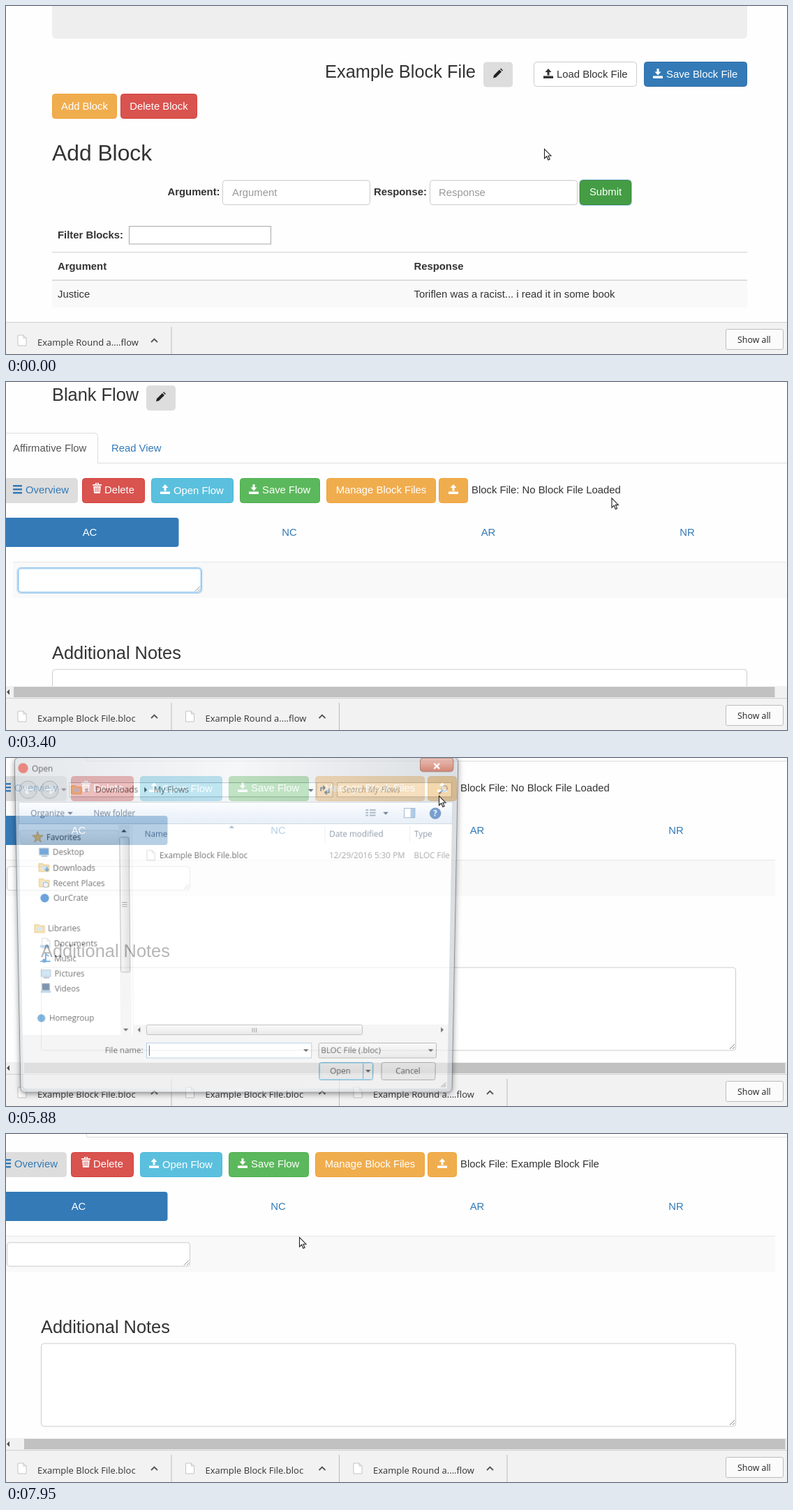
An HTML page for the animation above (8 s loop, 1119 by 500 pixels).

```html
<!DOCTYPE html>
<html lang="en">
<head>
<meta charset="utf-8">
<title>Block file demo</title>
<style>
html, body { margin: 0; width: 100%; height: 100%; overflow: hidden; background: #fefefe; }
svg { position: absolute; left: 0; top: 0; }
text { font: 14.85px "Liberation Sans", Arial, sans-serif; fill: #333; white-space: pre; }
text.ui { font-family: "Open Sans", "Noto Sans", sans-serif; fill: #222; }
#dialog { transform-origin: 330px 250px; overflow: visible; filter: drop-shadow(0 2px 4px #0009); }
</style>
</head>
<body>
<svg id="page" width="1119" height="500"></svg>
<svg id="dialog" width="660" height="500"></svg>
<svg id="pointer" width="1119" height="500"></svg>
<script>
const LOOP = 8000, BLUE = '#337ab7';

// Drawing helpers
const text = (x, y, s, style = '', attrs = '') => `<text x="${x}" y="${y}" style="${style}" ${attrs}>${s}</text>`;
const bold = (x, y, s) => text(x, y, s, 'font-weight:bold');
const middle = (x, y, s, fill) => text(x, y, s, `fill:${fill}`, 'text-anchor="middle"');
const ui = (x, y, s, fill = '#222', size = 12.2, more = '') => text(x, y, s, `fill:${fill};font-size:${size}px;${more}`, 'class="ui"');
const rect = (x, y, w, h, fill, stroke = 'none', r = 0) =>
  `<rect x="${x}" y="${y}" width="${w}" height="${h}" rx="${r}" fill="${fill}" stroke="${stroke}"/>`;
const path = (d, fill = 'none', stroke = 'none', width = 1) =>
  `<path d="${d}" fill="${fill}" stroke="${stroke}" stroke-width="${width}" fill-rule="evenodd"/>`;
const circle = (x, y, r, fill, stroke = 'none') => `<circle cx="${x}" cy="${y}" r="${r}" fill="${fill}" stroke="${stroke}"/>`;
const move = (x, y, s) => `<g transform="translate(${x} ${y})">${s}</g>`;
const box = (x, y, w, h, fill, stroke) => rect(x + .5, y + .5, w - 1, h - 1, fill, stroke, 4);
const field = (x, y, w, h, stroke = '#ccc') => box(x, y, w, h, '#fff', stroke);

const ICONS = {
  up: 'M0 10.5h14v3.5h-14zM7 0l4.5 5h-3v4.5h-3v-4.5h-3z',
  down: 'M0 10.5h14v3.5h-14zM7 9.5l-4.5-5h3v-4.5h3v4.5h3z',
  pencil: 'M0 14l1-4 8-8 3 3-8 8zM10 1l1-1 3 3-1 1z',
  trash: 'M0 2h4v-2h5v2h4v1.7h-13zM5 2h3v-1h-3zM1.2 4.7h10.6l-1 10.3h-8.6zM3.5 6.3h1v7h-1zM6 6.3h1v7h-1zM8.5 6.3h1v7h-1z',
  menu: 'M0 0h13v2.6h-13zM0 5h13v2.6h-13zM0 10h13v2.6h-13z',
};
const icon = (name, x, y, fill = '#fff') => move(x, y, path(ICONS[name], fill));
const glow = (x, y, w, h) => `<g opacity=".55">${rect(x - 1, y - 1, w + 2, h + 2, 'none', '#66afe9', 5)}</g>`;
const editButton = (x, y) => box(x, y, 42, 36, '#ddd', '#ddd') + icon('pencil', x + 14, y + 9, '#222');
const resizeGrip = (x, y) => path(`M${x - 7} ${y}l7-7M${x - 3} ${y}l3-3`, 'none', '#888');
const sheetIcon = (x, y) => path(`M${x} ${y}h8l4 4v11h-12zM${x + 8} ${y}v4h4`, '#fff', '#c4c4c4');
const triangle = (x, y, angle, fill = '#222') =>
  `<path transform="translate(${x} ${y}) rotate(${angle})" d="M-4-2h8l-4 4z" fill="${fill}"/>`;
const DOWN = 0, LEFT = 90, UP = 180, RIGHT = 270;

// Progress in n held steps: the first at a, the last at b
function steps(t, a, b, n) {
  if (t < a) return 0;
  if (t >= b) return 1;
  return Math.min(1, (Math.floor((t - a) / (b - a) * (n - 1)) + 1) / n);
}
const mix = (a, b, p) => a + (b - a) * p;

function blocksPage(t) {
  const saveHover = t >= 1600, clicked = t >= 1910;
  return rect(66, -20, 996, 67, '#eee', 'none', 6)
    + text(457, 102.5, 'Example Block File', 'font-size:25.4px') + editButton(684, 80.5)
    + box(756, 80, 148, 36, '#fff', '#ccc') + icon('up', 770, 90, '#333') + text(789, 103, 'Load Block File')
    + box(914, 80, 148, 36, saveHover ? '#286090' : BLUE, saveHover ? '#204d74' : '#2e6da4')
    + (clicked ? glow(914, 80.5, 148, 35) : '')
    + icon('down', 927, 90) + text(946, 102.5, 'Save Block File', 'fill:#fff')
    + box(66, 126, 93, 36, '#f0ad4e', '#eea236') + middle(112.5, 149, 'Add Block', '#fff')
    + box(164, 126, 110, 36, '#d9534f', '#d43f3a') + middle(219, 149, 'Delete Block', '#fff')
    + text(66, 222, 'Add Block', 'font-size:31.8px')
    + bold(231.5, 272, 'Argument:') + field(310, 250, 212, 36) + text(324, 273, 'Argument', 'fill:#999')
    + bold(527, 272, 'Response:') + field(607, 250, 212, 36) + text(620, 273, 'Response', 'fill:#999')
    + box(822, 250, 74, 36, clicked ? '#5cb85c' : '#449d44', clicked ? '#4cae4c' : '#398439')
    + (clicked ? '' : glow(822.5, 250.5, 73, 35)) + middle(859, 272, 'Submit', '#fff')
    + bold(74, 334, 'Filter Blocks:') + rect(176.5, 316.5, 203, 25.5, '#fff', '#a9a9a9')
    + rect(66, 353, 996, 1.5, '#ddd') + bold(74, 379, 'Argument') + bold(584.5, 379, 'Response')
    + rect(66, 393, 996, 2, '#ddd') + rect(66, 395, 996, 38, '#f9f9f9')
    + text(74, 418.5, 'Justice') + text(584.5, 418.5, 'Toriflen was a racist... i read it in some book');
}

function flowPage(t) {
  const scrolled = t >= 4080;
  const uploadHover = t >= 5090 && t < 7870;
  const arHover = t >= 4465 && t < 4720;
  const fileName = t < 7510 ? 'No Block File Loaded' : 'Example Block File';
  const page = text(66, 27, 'Blank Flow', 'font-size:25.4px') + editButton(201, 5)
    + path('M-20 73.5H128q3.5 0 3.5 4V116.5H1140', 'none', '#ddd')
    + text(10, 100, 'Affirmative Flow', 'fill:#555') + text(151, 100, 'Read View', `fill:${BLUE}`)
    + box(-20, 138, 123, 36, '#ddd', '#ddd') + icon('menu', 10, 148, BLUE) + text(28, 160, 'Overview', `fill:${BLUE}`)
    + box(109, 138, 90, 36, '#d9534f', '#d43f3a') + icon('trash', 124, 145) + text(141, 160, 'Delete', 'fill:#fff')
    + box(208, 138, 118, 36, '#5bc0de', '#46b8da') + icon('up', 221, 147) + text(240, 161, 'Open Flow', 'fill:#fff')
    + box(335, 138, 115, 36, '#5cb85c', '#4cae4c') + icon('down', 348, 147) + text(367, 160, 'Save Flow', 'fill:#fff')
    + box(459, 138, 157, 36, '#f0ad4e', '#eea236') + middle(537.5, 160, 'Manage Block Files', '#fff')
    + box(620, 138, 42, 36, uploadHover ? '#ec971f' : '#f0ad4e', uploadHover ? '#d58512' : '#eea236') + icon('up', 634, 147)
    + text(667, 160, 'Block File: ' + fileName)
    + rect(-20, 195, 267.5, 42, BLUE, 'none', 4) + middle(120, 221, 'AC', '#fff')
    + (arHover ? rect(564, 195, 254, 42, '#eee', 'none', 4) : '')
    + middle(406, 221, 'NC', BLUE) + middle(691, 221, 'AR', arHover ? '#23527c' : BLUE) + middle(976, 221, 'NR', BLUE)
    + rect(10, 258.5, 1108, 1, '#ddd') + rect(10, 259.5, 1108, 51, '#f9f9f9')
    + field(17, 267.5, 263, 35, scrolled ? '#ccc' : '#66afe9')
    + (scrolled ? '' : glow(17, 267.5, 263, 35)) + resizeGrip(278, 300.5)
    + text(66, 397.5, 'Additional Notes', 'font-size:25.4px') + field(66, 412.5, 996, 120) + resizeGrip(1060, 530);
  return move(scrolled ? -16 : 0, scrolled ? -112 : 0, page)
    + rect(0, 437, 1119, 17, '#f1f1f1') + rect(scrolled ? 26 : 11, 438, 1090.5, 15, '#c1c1c1')
    + triangle(3, 445.5, LEFT, '#505050');
}

function shelfItem(name, x, width, busy) {
  return move(x, 0,
    `<svg y="455" width="${width + 1}" height="45" viewBox="0 455 ${width + 1} 45">`
    + (busy ? `<g opacity="${busy}">${circle(23, 480, 13, '#e3eaf2', '#c5d6e6')}</g>` : '')
    + sheetIcon(17, 473) + ui(45, 488, name, '#333', 13)
    + path(`M${width - 29} 483l4.5-4.5 4.5 4.5`, 'none', '#555', 1.8) + '</svg>'
    + rect(width - .5, 461, 1, 39, '#bbb'));
}

function shelf(t) {
  const names = ['Example Round a....flow'], block = 'Example Block File.bloc';
  if (t >= 2210) names.unshift(block);
  if (t >= 4080) names.unshift(block);
  const p = Math.floor((t - 2210) / 77) * 77 / 800;
  const firstWidth = t < 2210 || t >= 3010 ? 237 : 237 * (1 - (1 - p) ** 3);
  const busy = t < 2210 ? 0 : 1 - steps(t, 2780, 3010, 4);
  let x = 0, out = rect(0, 454, 1119, 46, '#f2f2f2') + rect(0, 454, 1119, 1, '#cfcfcf');
  names.forEach((name, i) => {
    const width = i ? 237 : firstWidth;
    out += shelfItem(name, x, width, i ? 0 : busy);
    x += width + 3.5;
  });
  return out + rect(1031.5, 464.5, 82, 29, '#fbfbfb', '#bdbdbd', 2) + ui(1048, 484, 'Show all', '#222', 12.4);
}

function downloadStart(t) {
  if (t < 1990 || t >= 3240) return '';
  let out = path('M-1 430.5H372q5 0 5 5V454.5H-1z', '#f1f1f1', '#c8c8c8')
    + ui(25, 446, 'application/json;charset=utf-8,%7B"name"%3A"Example Blo...', '#777', 12);
  const p = steps(t, 2210, 2700, 7);
  if (p > 0 && p < 1) {
    const y = mix(329, 409, p);
    out += `<g opacity="${Math.min(1, 1.5 * Math.sin(Math.PI * p))}">`
      + path(`M27 ${y}h9v10h6l-10.5 11.5-10.5-11.5h6zM14 ${y + 36}h34v4h-34z`, '#4a8af4') + '</g>';
  }
  return out;
}

function folderIcon(x, y) {
  return path(`M${x} ${y}h6l2 2h7v10h-15z`, '#f3d58a', '#d2a84e') + rect(x + 4, y + 4, 8, 5, '#bcdcf0');
}
const screenIcon = (x, y, fill) => rect(x, y, 14, 10, fill, '#8aa4bc') + rect(x + 3, y + 11, 9, 2, '#98a8b8');

function sidebar() {
  const item = (name, y, picture) => picture + ui(55, y + 4.5, name);
  return rect(6.5, 100.5, 147, 21, 'url(#grey)', '#d8d8d8', 2)
    + path('M33 102l2 6h6l-5 4 2 6-5-4-5 4 2-6-5-4h6z', '#f6b64a', '#d48a2c')
    + ui(46, 115.5, 'Favorites')
    + item('Desktop', 133, screenIcon(35, 127, '#2877c8'))
    + item('Downloads', 156.5, folderIcon(34, 150) + path('M46 155v6m-3-3l3 3 3-3', 'none', BLUE, 2))
    + item('Recent Places', 179.5, folderIcon(34, 173) + circle(44, 182, 4, '#e8eef4', '#789'))
    + item('OurCrate', 202, circle(42, 202, 6.5, '#1a6fc9'))
    + folderIcon(26, 242) + ui(46, 252.5, 'Libraries')
    + item('Documents', 271, sheetIcon(37, 263) + rect(34, 273, 14, 4, '#9cc4e4'))
    + item('Music', 294, path('M42 297v-10l5 3M34 298h15', 'none', '#2a7fd0', 2) + circle(40, 297, 3, '#2a7fd0'))
    + item('Pictures', 317, screenIcon(35, 311, '#b8d8ee'))
    + item('Videos', 340, rect(36, 332, 11, 10, '#345a88', '#678') + rect(34, 343, 15, 3, '#9cc4e4'))
    + circle(34, 385, 6, '#3c8cc8') + ui(46, 389.5, 'Homegroup');
}

const gradient = (id, direction, ...colors) => `<linearGradient id="${id}" ${direction}>`
  + colors.map((c, i) => `<stop offset="${i / (colors.length - 1)}" stop-color="${c}"/>`).join('') + '</linearGradient>';
const ACROSS = 'x2="1" y2="0"', DOWNWARD = 'x2="0" y2="1"';

function dialogBox(t) {
  const hover = t >= 6950, caret = t < 6600;
  return '<defs>' + gradient('glass', ACROSS, '#d5dbe0', '#f0f2f4', '#c6ccd2')
    + gradient('bar', DOWNWARD, '#fbfdff', '#e8f0f9', '#dbe6f2') + gradient('grey', DOWNWARD, '#f6f6f6', '#dedede')
    + gradient('thumb', ACROSS, '#f3f3f3', '#cfcfcf') + gradient('red', DOWNWARD, '#dfa090', '#bb4126') + '</defs>'
    + rect(.5, -8, 659, 508, 'url(#glass)', '#4a4f55', 7)
    + circle(13, 8, 7.5, '#db4437') + ui(26, 13.5, 'Open', '#111')
    + rect(603.5, -7, 49, 20, 'url(#red)', '#6b2a20', 4) + path('M624 1l8 8m0-8l-8 8', 'none', '#fff', 2.4)
    // navigation
    + circle(20, 40, 13, '#cfd4d9', '#8b949d') + circle(52, 40, 13, '#cfd4d9', '#8b949d')
    + path('M27 40h-13m6-6l-6 6 6 6M45 40h13m-6-6l6 6-6 6', 'none', '#fff', 3) + triangle(73, 40, DOWN, '#667')
    + rect(81.5, 29.5, 368, 21, '#f7fafc', '#9aa5b0') + folderIcon(84, 34)
    + ui(104, 44, '«') + ui(120, 44.5, 'Downloads') + triangle(195, 40, RIGHT) + ui(207, 44.5, 'My Flows') + triangle(441, 41, DOWN, '#113')
    + rect(449.5, 29.5, 24, 21, '#f2f6fa', '#9aa5b0') + path('M456 42v-5h5m-2-3l3 3-3 3M468 38v6h-5m2-3l-3 3 3 3', 'none', '#2a74b8', 1.7)
    + rect(480.5, 29.5, 170, 21, '#f7fafc', '#9aa5b0') + ui(488, 44.5, 'Search My Flows', '#7b8088', 12, 'font-style:italic')
    + circle(640, 38, 4.2, 'none', '#3a6ea5') + path('M637 41l-5 5', 'none', '#3a6ea5', 2.2)
    // toolbar
    + rect(5.5, 58.5, 647, 32, 'url(#bar)', '#b5c2d0')
    + ui(23, 79.5, 'Organize', '#1e395b') + triangle(82, 75, DOWN, '#1e395b') + ui(117, 79.5, 'New folder', '#1e395b')
    + path('M523 70h4m2 0h9M523 74h4m2 0h9M523 78h4m2 0h9', 'none', '#7890a8', 2) + triangle(553, 75, DOWN, '#1e395b')
    + rect(580.5, 67.5, 16, 14, '#fff', '#6a8cae') + rect(590, 68, 6, 13, '#7db0e0')
    + circle(627, 75, 8, '#2a68b8', '#1c4788') + ui(624, 79.5, '?', '#fff', 12, 'font-weight:bold')
    // file list
    + rect(5, 91, 647, 320, '#fff') + sidebar()
    + rect(154, 92, 17, 319, '#f0f0f0') + triangle(162, 101, UP) + rect(155.5, 110.5, 14, 204, 'url(#thumb)', '#9a9a9a', 2)
    + path('M158 208.5h8m-8 3h8m-8 3h8', 'none', '#777') + triangle(162, 403, DOWN) + rect(173, 92, 1, 319, '#e4e8ee')
    + ui(193, 110, 'Name', '#4c607a') + triangle(323, 95, UP, '#7a9cc0')
    + rect(462, 93, 1, 26, '#dde5ee') + ui(469, 110, 'Date modified', '#4c607a') + rect(589, 93, 1, 26, '#dde5ee') + ui(596, 110, 'Type', '#4c607a')
    + (hover ? rect(190.5, 126.5, 461, 22, '#f4f9fe', '#b8d6f0', 2) : '')
    + sheetIcon(196, 130) + ui(215, 142.5, 'Example Block File.bloc') + ui(469, 142.5, '12/29/2016 5:30 PM', '#777') + ui(596, 142.5, 'BLOC File', '#777')
    + rect(174, 395, 478, 16, '#f0f0f0') + triangle(182, 403, LEFT) + triangle(643, 403, RIGHT)
    + rect(193.5, 395.5, 328, 15, 'url(#grey)', '#9a9a9a', 2) + path('M354.5 400v7m3-7v7m3-7v7', 'none', '#666')
    // controls
    + rect(5, 411, 647, 83, '#f0f0f0') + ui(130, 439.5, 'File name:')
    + rect(193.5, 423.5, 251, 23, '#fff', '#8db2d8') + triangle(436, 435, DOWN) + (caret ? rect(197, 427, 1, 16, '#000') : '')
    + rect(455.5, 423.5, 179, 23, 'url(#grey)', '#8a8a8a', 2) + ui(459, 439.5, 'BLOC File (.bloc)') + triangle(626, 435, DOWN)
    + rect(456.5, 453.5, 82, 27, 'url(#grey)', '#3c7fb1', 3) + rect(457.5, 454.5, 80, 25, 'none', '#8edbf5', 2)
    + ui(473, 471, 'Open') + rect(523, 455, 1, 24, '#3c7fb1') + triangle(531, 467, DOWN)
    + rect(551.5, 453.5, 82, 27, 'url(#grey)', '#808080', 3) + ui(573, 471, 'Cancel')
    + path('M643 492l7-7m-3 7l3-3', 'none', '#aaa', 2);
}

// Pointer moves: start, end, steps, x, y, hand
const MOVES = [
  [680, 990, 5, 872, 155], [1220, 1680, 7, 958, 107, 1], [3240, 4010, 11, 626, 325], [4080, 4080, 1, 597, 182],
  [4390, 4540, 3, 630, 90, 1], [4690, 4720, 2, 630, 70, 1], [4940, 5240, 5, 615, 53, 1], [5400, 5400, 1, 620, 54],
  [6410, 7110, 10, 528, 131], [7870, 7950, 2, 420, 148],
];
function pointerAt(t) {
  let x = 771, y = 205, hand = 0;
  for (const [a, b, n, toX, toY, toHand = 0] of MOVES) {
    const p = steps(t, a, b, n);
    x = mix(x, toX, p);
    y = mix(y, toY, p);
    if (p >= .7) hand = toHand;
    else if (p > 0) hand = hand && toHand;
  }
  const shape = hand
    ? 'M4 1.5q1.5-1.5 2.7.3v6q1-1 2.2 0 1-.8 2.2.3 1.2-.6 2.2.8v4.6l-1.4 4.8h-6.2l-4.9-6.5q.2-2 2-1.2l1.2 1.4z'
    : 'M.5.5v13.5l3.2-3 2.2 5.2 2.2-1-2.2-5h4z';
  return move(x, y, path(shape, '#fff', '#222', 1.1));
}

const last = {};
function show(id, markup) {
  if (last[id] !== markup) document.getElementById(id).innerHTML = last[id] = markup;
}

function frame() {
  const t = performance.now() % LOOP;
  show('page', (t < 3240 ? blocksPage(t) : flowPage(t)) + shelf(t) + downloadStart(t));

  const opened = 1 - (1 - steps(t, 5800, 6110, 5)) ** 2;
  const shown = opened * (1 - steps(t, 7280, 7590, 5));
  const away = 1 - shown;
  const style = document.getElementById('dialog').style;
  style.visibility = shown ? 'visible' : 'hidden';
  style.opacity = shown;
  style.transform = away ? `translateY(${-8.6 * away}px) perspective(1500px) rotateX(${-14 * away}deg) scale(${1 - .137 * away})` : 'none';
  show('dialog', shown ? dialogBox(t) : '');

  show('pointer', pointerAt(t));
  requestAnimationFrame(frame);
}
frame();
</script>
</body>
</html>
```
